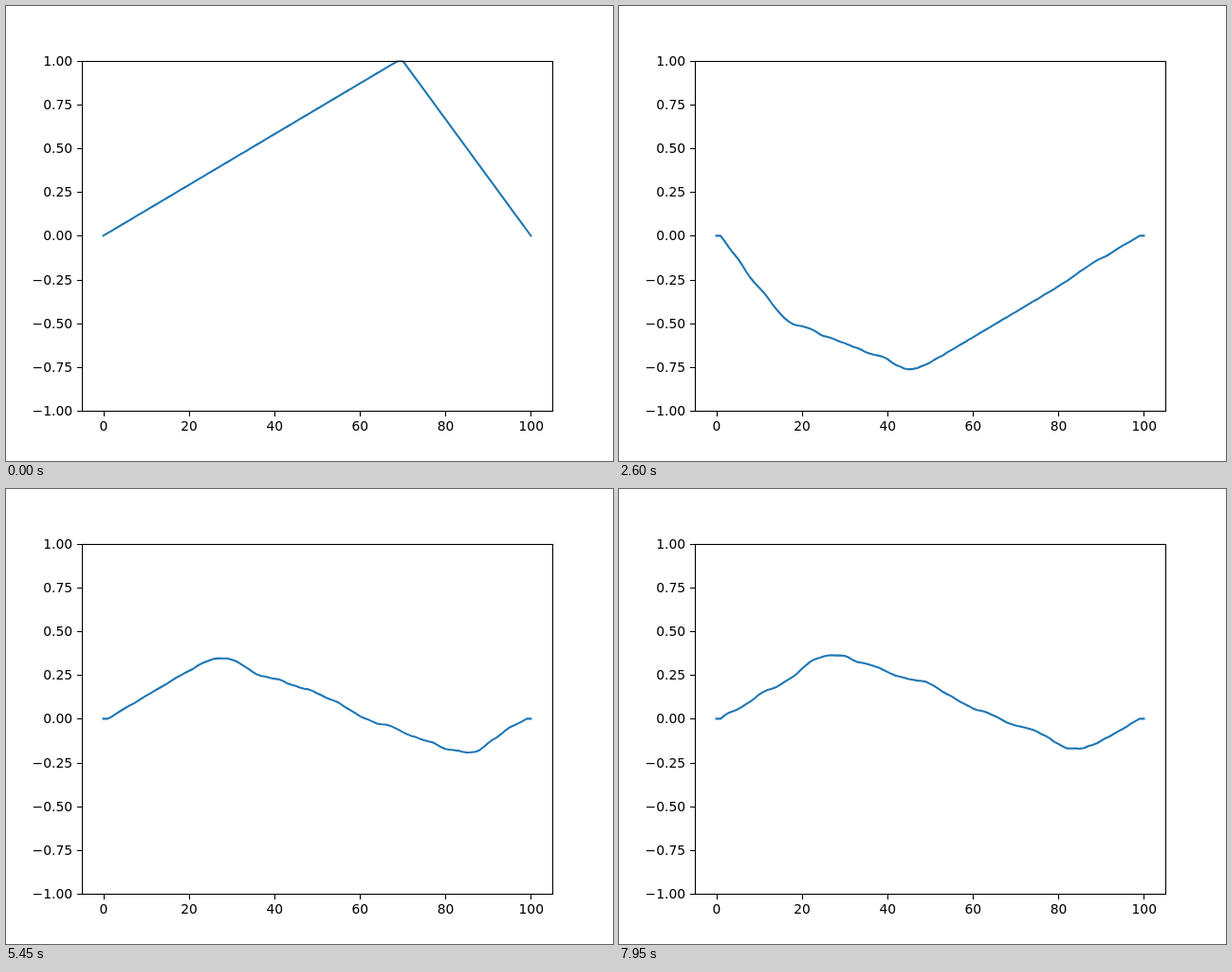
An HTML page that plays this animation: 640 by 480 pixels, repeating every 8000 ms.

```html
<!DOCTYPE html>
<html lang="en">
<head>
<meta charset="utf-8">
<title>Plucked string</title>
<style>
  html, body { margin: 0; width: 100%; height: 100%; overflow: hidden; background: #fff; }
  svg { display: block; width: 640px; height: 480px; }
  text { font: 13.889px "DejaVu Sans", sans-serif; fill: #000; }
  .axes { fill: none; stroke: #000; stroke-width: 1.11; }
  #string { fill: none; stroke: #1f77b4; stroke-width: 2.083; stroke-linejoin: round; stroke-linecap: square; }
</style>
</head>
<body>
<svg viewBox="0 0 640 480">
  <clipPath id="plot"><rect x="80" y="57.6" width="496" height="369.6"/></clipPath>
  <g clip-path="url(#plot)"><path id="string"/></g>
  <path id="ticks" class="axes"/>
  <rect class="axes" x="80.5" y="58.5" width="496" height="369"/>
  <g id="labels"></g>
</svg>
<script>
const FRAME_MS = 50, FRAMES = 160;
const N = 100, STEPS = 22, COURANT = 0.1;

const px = x => 102.545 + x * 4.50909;
const py = y => 242.4 - y * 184.8;
const byId = id => document.getElementById(id);

function addLabel(str, x, y, anchor) {
  const el = document.createElementNS("http://www.w3.org/2000/svg", "text");
  el.setAttribute("x", x);
  el.setAttribute("y", y);
  el.setAttribute("text-anchor", anchor);
  el.textContent = str;
  byId("labels").append(el);
}

function drawAxes() {
  let d = "";
  for (let x = 0; x <= 100; x += 20) {
    d += `M${Math.round(px(x)) + 0.5} 428v5`;
    addLabel(x, px(x) + 0.3, 448, "middle");
  }
  for (let y = -1; y <= 1; y += 0.25) {
    const row = Math.round(py(y));
    d += `M80 ${row + 0.5}h-5`;
    addLabel(y.toFixed(2).replace("-", "\u2212"), 70.1, row + 5, "end");
  }
  byId("ticks").setAttribute("d", d);
}

const toPath = u => "M" + u.map((y, i) => px(i).toFixed(2) + " " + py(y).toFixed(2)).join("L");

// Wave equation by finite differences; the two nodes at each end are held at zero.
function simulate() {
  const u = Array.from({ length: N + 1 }, (_, i) => i < 70 ? i / 69 : (N - i) / 30);
  const v = u.map(() => 0);
  const paths = [toPath(u)];
  u[1] = u[N - 1] = 0;
  while (paths.length < FRAMES) {
    for (let s = 0; s < STEPS; s++) {
      for (let i = 2; i < N - 1; i++) v[i] += COURANT ** 2 * (u[i + 1] + u[i - 1] - 2 * u[i]);
      for (let i = 2; i < N - 1; i++) u[i] += v[i];
    }
    paths.push(toPath(u));
  }
  return paths;
}

drawAxes();
const paths = simulate();
const start = performance.now();

function render(now) {
  const t = Math.max(0, now - start);
  byId("string").setAttribute("d", paths[Math.floor(t / FRAME_MS) % FRAMES]);
  requestAnimationFrame(render);
}
render(start);
</script>
</body>
</html>
```
